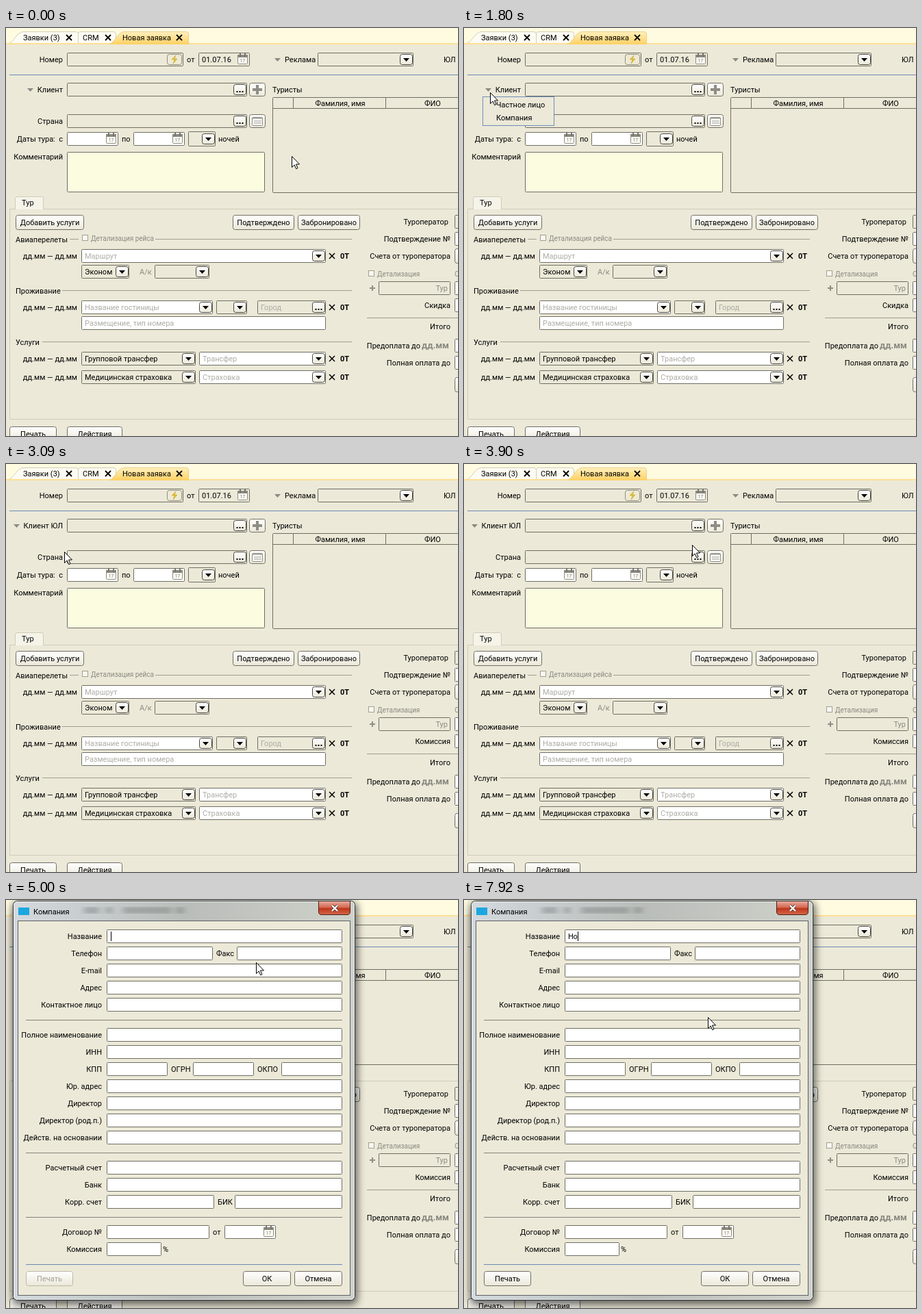
Animation of 660x596 px, one loop 8 s. Source, as an HTML page:

```html
<!DOCTYPE html>
<html lang="ru">
<head>
<meta charset="utf-8">
<title>Новая заявка</title>
<style>
html, body { margin: 0; width: 100%; height: 100%; overflow: hidden; background: #ece9d8; }
svg { display: block; width: 660px; height: 596px; }
text { font: 11px Roboto, "Liberation Sans", sans-serif; white-space: pre; }
.small { font-size: 10px; }
.bold { font-weight: 700; }
.big { font-size: 13px; font-weight: 700; }
.tiny { font-size: 6.5px; }

/* One 8 s clock; every change is a hard step. */
.anim { animation: 8s step-end infinite; }
#cursor { animation-name: move; }
#ring { animation-name: click; }
#hover { animation-name: hover; }
#menu { animation-name: menu; }
#item1 { animation-name: item1; }
#item2 { animation-name: item2; }
.person { animation-name: person; }
.company { animation-name: company; }
#gold { animation-name: gold; }
#dialog { animation-name: dialog; }
#disabled { animation-name: disabled; }
#caret { animation-name: caret; }
#key1 { animation-name: key1; }
#key2 { animation-name: key2; }

@keyframes move {
  0% { transform: translate(417px, 187px); }
  3.5% { transform: translate(406px, 184px); }
  5.25% { transform: translate(360px, 172px); }
  7% { transform: translate(265px, 148px); }
  8.75% { transform: translate(162px, 122px); }
  10.375% { transform: translate(90px, 104px); }
  12.125% { transform: translate(48px, 92px); }
  13.875% { transform: translate(36px, 88px); }
  20.875% { transform: translate(38px, 94px); }
  22.75% { transform: translate(44px, 106px); }
  24.625% { transform: translate(52px, 117px); }
  26.375% { transform: translate(59px, 126px); }
  28.25% { transform: translate(63px, 129px); }
  37% { transform: translate(66px, 129px); }
  38.625% { transform: translate(85px, 128px); }
  40.375% { transform: translate(120px, 127px); }
  42% { transform: translate(165px, 126px); }
  43.75% { transform: translate(215px, 124px); }
  45.5% { transform: translate(262px, 122px); }
  47.125% { transform: translate(299px, 120px); }
  48.75% { transform: translate(333px, 118px); }
  50.5% { transform: translate(352px, 107px); }
  52.25% { transform: translate(361px, 96px); }
  54% { transform: translate(365px, 91px); }
  65.875% { transform: translate(363px, 101px); }
  67.625% { transform: translate(361px, 119px); }
  69.375% { transform: translate(359px, 141px); }
  71.125% { transform: translate(357px, 158px); }
  73% { transform: translate(356px, 167px); }
  75% { transform: translate(356px, 170px); }
  77.25% { transform: translate(356px, 171px); }
}
@keyframes click {
  0%, 19.125%, 37%, 62.5% { opacity: 0; }
  17.25%, 35.25%, 61% { opacity: 1; }
}
@keyframes hover { 0%, 19.125% { opacity: 0; } 13.875% { opacity: 1; } }
@keyframes menu { 0%, 37% { opacity: 0; } 19.125% { opacity: 1; } }
@keyframes item1 { 0%, 26.375% { opacity: 0; } 22.75% { opacity: 1; } }
@keyframes item2 { 0% { opacity: 0; } 26.375% { opacity: 1; } }
@keyframes person { 0% { opacity: 1; } 37% { opacity: 0; } }
@keyframes company { 0% { opacity: 0; } 37% { opacity: 1; } }
@keyframes gold { 0% { opacity: 0; } 54% { opacity: 1; } }
@keyframes dialog { 0% { opacity: 0; } 62.5% { opacity: 1; } }
@keyframes disabled { 0% { opacity: 1; } 64.125% { opacity: 0; } }
@keyframes caret {
  0%, 75%, 87.625% { opacity: 1; transform: none; }
  69.375%, 81.875% { opacity: 0; transform: none; }
  93.375% { opacity: 1; transform: translateX(7px); }
  99% { opacity: 1; transform: translateX(13px); }
}
@keyframes key1 { 0% { opacity: 0; } 93.375% { opacity: 1; } }
@keyframes key2 { 0% { opacity: 0; } 99% { opacity: 1; } }
</style>
</head>
<body>
<svg id="stage" viewBox="0 0 660 596"></svg>
<script>
const BG = '#ece9d8', WHITE = '#fff', EDGE = '#6f6e63', GREY = '#8b8a82', HINT = '#adaca6', LINE = '#a19f92', BLUE = '#6a8bb3';

const rect = (x, y, w, h, fill, extra = '') => `<rect x="${x}" y="${y}" width="${w}" height="${h}" fill="${fill}" ${extra}/>`;
// Outlined box given by its outer pixel edges.
const box = (x1, y1, x2, y2, fill = WHITE, edge = EDGE, r = 1) =>
  rect(x1 + .5, y1 + .5, x2 - x1 - 1, y2 - y1 - 1, fill, `stroke="${edge}" rx="${r}"`);
const path = (d, fill, stroke = 'none', w = 1) => `<path d="${d}" fill="${fill}" stroke="${stroke}" stroke-width="${w}"/>`;
const hline = (x1, x2, y, color = LINE) => rect(x1, y, x2 - x1, 1, color);
// Text is placed by the middle of its capitals.
const text = (x, y, str, { fill = '#000', anchor = 'start', cls = '' } = {}) =>
  `<text x="${x}" y="${y + 4}" fill="${fill}" text-anchor="${anchor}" class="${cls}">${str}</text>`;
const label = (x, y, str, opt) => text(x, y, str, { anchor: 'end', ...opt });
const mid = (x, y, str, opt) => text(x, y, str, { anchor: 'middle', ...opt });
const group = (id, body) => `<g id="${id}" class="anim">${body}</g>`;
const swap = (cls, body) => `<g class="anim ${cls}">${body}</g>`;

const field = (x1, x2, cy, fill) => box(x1, cy - 10, x2, cy + 10, fill);
const down = (cx, cy, color = '#000') => path(`M${cx - 4.5} ${cy - 2}h9l-4.5 5z`, color);
const button = (x1, x2, cy, str, fill = '#000', edge = EDGE) =>
  box(x1, cy - 11, x2, cy + 11, 'url(#btn)', edge, 3) + mid((x1 + x2) / 2, cy, str, { fill });
const knob = (right, cy) => box(right - 20, cy - 8, right - 1, cy + 8, 'url(#btn)', '#45443d', 3);
const combo = (x1, x2, cy, str = '', fill = BG, color = '#000') =>
  field(x1, x2, cy, fill) + knob(x2, cy) + down(x2 - 10.5, cy) + text(x1 + 5, cy, str, { fill: color });
const picker = (x1, x2, cy, str = '') => field(x1, x2, cy, BG) + knob(x2, cy) +
  [-4, 0, 4].map(d => rect(x2 - 11.5 + d, cy + 2, 2, 2, '#000')).join('') + text(x1 + 5, cy, str, { fill: HINT });
const cross = (cx, cy, w = 1.5) => path(`M${cx - 4} ${cy - 4}l8 8m0 -8l-8 8`, 'none', '#000', w);
const plus = (cx, cy, r, w) => path(`M${cx - r} ${cy}h${2 * r}M${cx} ${cy - r}v${2 * r}`, 'none', '#8f8e86', w);
const check = (x, y) => box(x, y, x + 9, y + 9, '#f8f7f0', LINE, 0);
const calendar = (x, y) => box(x, y + 2, x + 15, y + 16, '#fbfaf4', '#8c8a80') + rect(x, y + 2, 15, 4, '#8c8a80') +
  rect(x + 3, y, 2, 5, '#77756c') + rect(x + 10, y, 2, 5, '#77756c') +
  mid(x + 7.5, y + 9, '17', { fill: '#77756c', cls: 'tiny' });
const dates = (x1, cy, fill = WHITE) => field(x1, x1 + 75, cy, fill) + calendar(x1 + 57, cy - 9);
const rowEnds = cy => label(104, cy, 'дд.мм — дд.мм') + cross(476, cy) + text(488, cy, '0Т', { cls: 'bold' });

const defs = `<defs>
  <linearGradient id="btn" x2="0" y2="1"><stop stop-color="#fff"/><stop offset="1" stop-color="#ebe8d9"/></linearGradient>
  <linearGradient id="tab" x2="0" y2="1"><stop stop-color="#fff0bd"/><stop offset="1" stop-color="#ffd062"/></linearGradient>
  <linearGradient id="goldFill" x2="0" y2="1"><stop stop-color="#ffefb0"/><stop offset="1" stop-color="#f3c650"/></linearGradient>
  <linearGradient id="glass" x2="1" y2="0"><stop stop-color="#d3d9de"/><stop offset=".5" stop-color="#b9bdb9"/><stop offset="1" stop-color="#cfd2ca"/></linearGradient>
  <linearGradient id="red" x2="0" y2="1"><stop stop-color="#e9a99b"/><stop offset=".48" stop-color="#d1654f"/><stop offset=".5" stop-color="#bd3216"/><stop offset="1" stop-color="#d4694a"/></linearGradient>
  <filter id="blur"><feGaussianBlur stdDeviation="4"/></filter>
  <filter id="shade" x="-10%" y="-10%" width="120%" height="120%"><feGaussianBlur stdDeviation="6"/></filter>
</defs>`;

const tabs = rect(0, 0, 660, 22, '#fefbe1') +
  path('M3.5 22.5C12 21 15 6.500 25 5.500H102Q105.500 5.500 105.500 9V22.500', '#fdfcf3', '#d3cfb8') +
  path('M105.500 22.500V8Q106 5.500 109 5.500H157Q160.500 5.500 160.500 9V22.500', '#fdfcf3', '#d3cfb8') +
  rect(0, 22, 660, 2, '#ffdf96') +
  path('M150 24C160 21 162 6.500 172 5.500H263Q266.500 5.500 266.500 9V24', 'url(#tab)', '#edd08a') +
  text(25, 14, 'Заявки (3)') + cross(92, 14, 1.8) + text(112, 14, 'CRM') + cross(149, 14, 1.8) +
  text(170, 14, 'Новая заявка') + cross(253, 14, 1.8);

const header =
  label(83, 46, 'Номер') + field(89, 259, 46, BG) + box(235, 38, 257, 54, '#eeead5', '#8e8c7d', 3) +
  path('M248 40l-6 6h4l-2 6 6-7h-4z', '#e8c326', '#b7962b', .5) +
  text(264, 46, 'от') + dates(281, 46, BG) + text(286, 46, '01.07.16') +
  down(396.5, 46, GREY) + text(407, 46, 'Реклама') + combo(455, 595, 46) + text(639, 46, 'ЮЛ') +
  hline(5, 660, 68, BLUE);

const client =
  swap('person', down(35.5, 90, GREY) + label(83, 90, 'Клиент')) +
  swap('company', down(15.5, 90, GREY) + label(83, 90, 'Клиент ЮЛ')) +
  group('hover', box(27, 81, 44, 98, '#f8f7ee', '#000', 0) + down(35.5, 90, GREY)) +
  picker(89, 352, 90) + box(355, 80, 379, 100, 'url(#btn)', EDGE, 3) +
  group('gold', box(355, 80, 379, 100, 'url(#goldFill)', '#8d7a3c', 3)) + plus(367, 90, 7, 4) +
  label(83, 136, 'Страна') + picker(89, 352, 136) + box(355, 126, 379, 146, 'url(#btn)', EDGE, 3) +
  box(359, 130, 375, 143, WHITE, GREY) + rect(360, 131, 14, 2, '#b5b4ac') +
  [135, 137, 139].map(y => hline(362, 373, y, '#b5b4ac')).join('') +
  label(83, 162, 'Даты тура:  с') + dates(89, 162) + text(169, 162, 'по') + dates(186, 162) +
  box(266, 151, 306, 173, BG) + knob(306, 162) + down(295.5, 162) + text(310, 162, 'ночей') +
  label(83, 188, 'Комментарий') + box(89, 181, 378, 240, '#fcfce1');

const tourists = text(389, 90, 'Туристы') + box(389, 101, 670, 241, BG) + hline(390, 660, 117, EDGE) +
  rect(419, 102, 1, 15, EDGE) + rect(554, 102, 1, 15, EDGE) + mid(488, 110, 'Фамилия, имя') + mid(623, 110, 'ФИО');

const tour =
  path('M5.500 264.500V571.500H660M5.500 264.500H660', 'none', '#cfccba') +
  path('M13.500 265V249Q13.500 246.500 16 246.500H52Q54.500 246.500 54.500 249V265', '#f6f4e9', '#cfccba') + text(23, 255, 'Тур') +
  button(14, 114, 284, 'Добавить услуги') + button(331, 421, 284, 'Подтверждено') + button(426, 517, 284, 'Забронировано') +
  text(14, 309, 'Авиаперелеты') + hline(93, 106, 308) + check(111, 302) +
  text(124, 307, 'Детализация рейса', { fill: GREY, cls: 'small' }) + hline(218, 505, 308) +
  rowEnds(333) + combo(110, 467, 333, 'Маршрут', WHITE, HINT) +
  combo(110, 180, 356, 'Эконом') + text(195, 356, 'А/к', { fill: GREY }) + combo(217, 297, 356) +
  text(14, 384, 'Проживание') + hline(82, 505, 383) +
  rowEnds(408) + combo(110, 302, 408, 'Название гостиницы', WHITE, HINT) + combo(307, 352, 408) + picker(367, 467, 408, 'Город') +
  field(110, 467, 431, WHITE) + text(115, 431, 'Размещение, тип номера', { fill: HINT }) +
  text(14, 459, 'Услуги') + hline(53, 505, 458) +
  rowEnds(483) + combo(110, 277, 483, 'Групповой трансфер') + combo(282, 467, 483, 'Трансфер', WHITE, HINT) +
  rowEnds(510) + combo(110, 277, 510, 'Медицинская страховка') + combo(282, 467, 510, 'Страховка', WHITE, HINT);

const totals =
  label(646, 283, 'Туроператор') + field(655, 680, 283, BG) +
  label(649, 308, 'Подтверждение №') + field(655, 680, 308) +
  label(649, 333, 'Счета от туроператора') + box(655, 322, 690, 344, 'url(#btn)', EDGE, 3) +
  check(529, 354) + text(542, 359, 'Детализация', { fill: GREY, cls: 'small' }) + text(655, 359, 'С', { fill: GREY, cls: 'small' }) +
  plus(535, 380, 4, 2) + field(544, 649, 380, BG) + label(645, 380, 'Тур', { fill: GREY }) + field(655, 680, 380) +
  swap('person', label(649, 405, 'Скидка')) + swap('company', label(649, 405, 'Комиссия')) + field(655, 680, 405) +
  hline(527, 660, 423) + label(649, 436, 'Итого') +
  label(605, 464, 'Предоплата до') + label(647, 464, 'дд.мм', { fill: GREY, cls: 'big' }) + field(655, 680, 464) +
  label(649, 489, 'Полная оплата до') + field(655, 680, 489) + box(655, 510, 690, 532, 'url(#btn)', EDGE, 3) +
  button(5, 74, 593, 'Печать') + button(89, 170, 593, 'Действия');

const menuItem = (id, y) => group(id, box(29, y, 131, y + 19, '#fce08b', '#a98a3e', 0));
const menu = group('menu', box(27, 100, 132, 143, BG, '#6f8fb8', 0) + menuItem('item1', 103) + menuItem('item2', 122) +
  text(47, 112, 'Частное лицо') + text(47, 131, 'Компания'));

// Rows of the company form: y, label, field edges with optional text between them.
const rows = [
  [53, 'Название'], [78, 'Телефон', 147, 302, 'Факс', 337, 491], [103, 'E-mail'], [128, 'Адрес'], [153, 'Контактное лицо'],
  [197, 'Полное наименование'], [222, 'ИНН'], [247, 'КПП', 147, 236, 'ОГРН', 273, 362, 'ОКПО', 402, 491],
  [272, 'Юр. адрес'], [297, 'Директор'], [322, 'Директор (род.п.)'], [347, 'Действ. на основании'],
  [391, 'Расчетный счет'], [416, 'Банк'], [441, 'Корр. счет', 147, 304, 'БИК', 334, 491],
  [485, 'Договор №', 147, 297, 'от', 319, 394], [510, 'Комиссия', 147, 227, '%']
];
const formRow = ([y, name, ...parts]) => {
  if (!parts.length) parts = [147, 491];
  let out = label(140, y, name);
  for (let i = 0; i < parts.length; i += 3) {
    const [x1, x2, next] = parts.slice(i, i + 3);
    out += field(x1, x2, y) + (next ? text(x2 + (next === '%' ? 2 : 5), y, next) : '');
  }
  return out;
};

const smudge = (x, w) => rect(x, 11, w, 8, '#5c6062', 'opacity=".5"');
const dialog = group('dialog',
  rect(9, 3, 504, 588, '#000', 'rx="8" opacity=".6" filter="url(#shade)"') +
  box(10, 1, 510, 585, 'url(#glass)', '#2c2f33', 6) + box(11, 2, 509, 584, 'none', '#eef1f1', 5) +
  `<g filter="url(#blur)">${smudge(114, 22) + smudge(146, 9) + smudge(171, 70) + smudge(248, 12)}</g>` +
  rect(18, 11, 16, 11, '#1ba7e0') + text(40, 17, 'Компания') +
  path('M456.500 2V17Q456.500 21.500 461 21.500H498Q502.500 21.500 502.500 17V2', 'url(#red)', '#4d1f1a') +
  path('M476 8l8 8m0-8l-8 8', 'none', '#5b3a36', 4) + path('M476 8l8 8m0-8l-8 8', 'none', WHITE, 2.4) +
  box(17, 30, 503, 578, BG, '#5c6064', 0) +
  rows.map(formRow).join('') + calendar(376, 476) +
  [175, 369, 463].map(y => hline(29, 491, y, '#85847c')).join('') + hline(29, 491, 532, BLUE) +
  button(29, 98, 553, 'Печать') +
  group('disabled', rect(29, 542, 69, 22, BG) + button(29, 98, 553, 'Печать', '#a3a196', '#bbb8a8')) +
  button(346, 416, 553, 'ОК') + button(421, 491, 553, 'Отмена') +
  group('key1', text(152, 53, 'Н')) + group('key2', text(159.5, 53, 'о')) +
  group('caret', rect(153, 46, 1, 14, '#000')));

const cursor = group('cursor',
  group('ring', '<circle cx="1" cy=".5" r="10" fill="#ffd84a" fill-opacity=".45" stroke="#000"/>') +
  path('M.5.5V16.500L4.200 13L6.700 18.700L9 17.700L6.500 12H11.500Z', WHITE, '#000'));

document.getElementById('stage').innerHTML =
  defs + rect(0, 0, 660, 596, BG) + tabs + header + client + tourists + tour + totals + menu + dialog + cursor;
</script>
</body>
</html>
```
